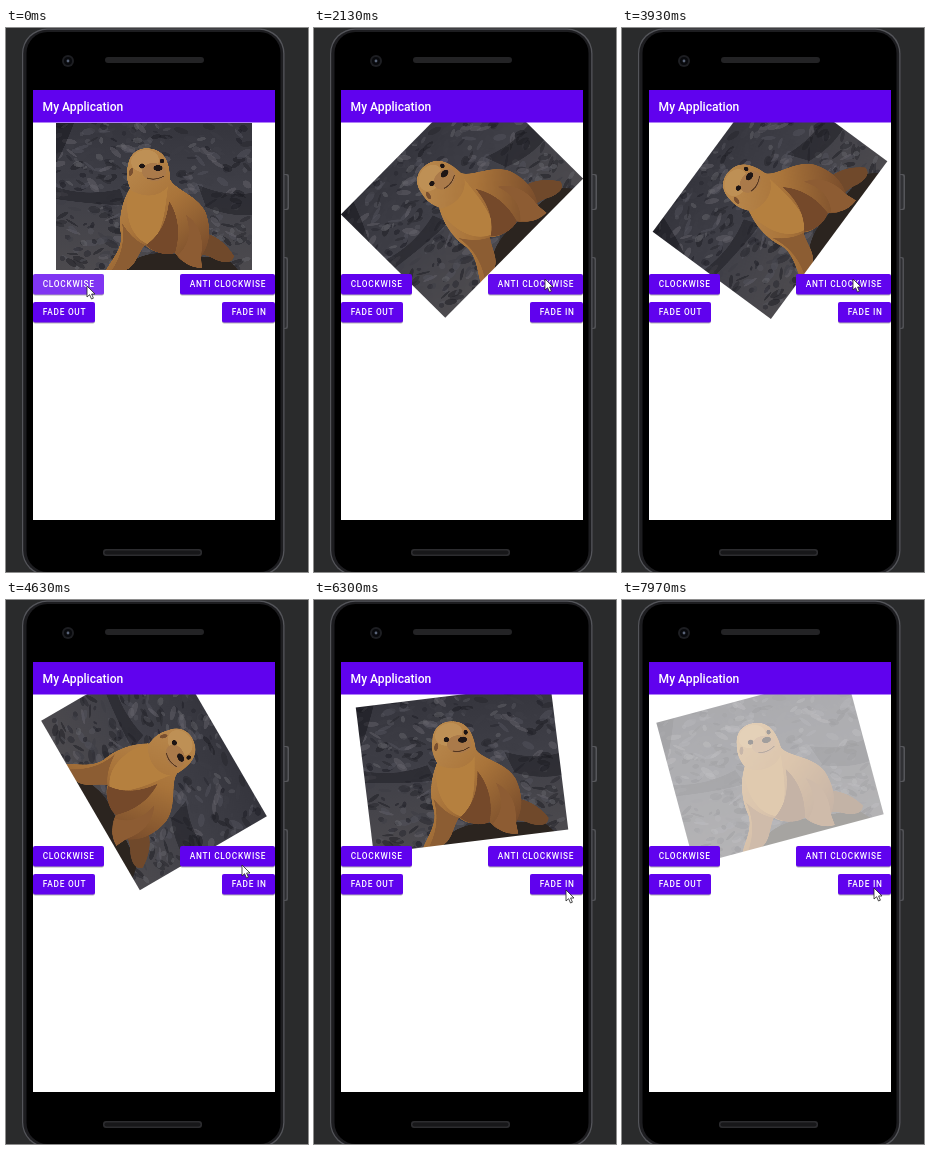
These frames come from a looping animation (302x544 px, 8000 ms). An HTML page with a canvas:

```html
<!DOCTYPE html>
<html lang="en">
<head>
<meta charset="utf-8">
<title>Rotate and fade</title>
<style>
html, body { margin: 0; width: 100%; height: 100%; overflow: hidden; background: #2a2b2c; }
canvas { display: block; width: 302px; height: 544px; }
</style>
</head>
<body>
<canvas id="stage"></canvas>
<script>
const W = 302, H = 544, LOOP = 8000;
const PHOTO = { w: 196, h: 147, cx: 148, cy: 168.5 };
const SCREEN = { x: 27, y: 62, w: 242, h: 430 };
const PURPLE = '#6002ee';

const stage = document.getElementById('stage');
const dpr = window.devicePixelRatio || 1;
stage.width = W * dpr;
stage.height = H * dpr;
const ctx = stage.getContext('2d');

const clamp = v => Math.max(0, Math.min(1, v));
const ease = p => 0.5 - Math.cos(Math.PI * clamp(p)) / 2;
const lerp = (a, b, p) => a + (b - a) * p;

function box(c, x, y, w, h, r, fill) {
  c.beginPath();
  c.roundRect(x, y, w, h, r);
  c.fillStyle = fill;
  c.fill();
}

function oval(c, x, y, rx, ry, fill, turn = 0) {
  c.beginPath();
  c.ellipse(x, y, rx, ry, turn, 0, Math.PI * 2);
  c.fillStyle = fill;
  c.fill();
}

function shape(c, path, fill) {
  c.fillStyle = fill;
  c.fill(new Path2D(path));
}

// Seeded generator keeps the rocks the same on every load.
function seeded(seed) {
  return () => {
    seed = (seed * 1664525 + 1013904223) % 4294967296;
    return seed / 4294967296;
  };
}

function drawRocks(c) {
  const bg = c.createLinearGradient(0, 0, 0, PHOTO.h);
  bg.addColorStop(0, '#35353d');
  bg.addColorStop(0.45, '#3f3f47');
  bg.addColorStop(1, '#4c4a4e');
  c.fillStyle = bg;
  c.fillRect(0, 0, PHOTO.w, PHOTO.h);

  const rnd = seeded(29);
  const tones = ['#1c1c23', '#26262d', '#53535c', '#64636a', '#3d3d45'];
  c.globalAlpha = 0.5;
  for (let i = 0; i < 420; i++) {
    oval(c, rnd() * PHOTO.w, rnd() * PHOTO.h, 2 + rnd() * 6, 1 + rnd() * 2.5,
      tones[Math.floor(rnd() * tones.length)], -0.6 + rnd() * 1.5);
  }
  shape(c, 'M0 0 H18 Q8 26 0 40Z', '#15151b');
  shape(c, 'M0 64 Q30 74 64 66 L70 82 Q40 82 0 76Z', '#1d1d23');
  shape(c, 'M142 62 Q170 74 196 70 V92 Q174 94 150 84Z', '#1d1d23');
  c.globalAlpha = 1;
}

function drawSeal(c) {
  shape(c, 'M66 147 Q80 130 108 130 L172 136 L182 147Z', '#2b241f');
  shape(c, 'M138 108 Q164 110 178 133 Q176 143 160 137 Q148 130 140 132Z', '#70492b');

  const fur = c.createLinearGradient(64, 30, 152, 135);
  fur.addColorStop(0, '#bc8c50');
  fur.addColorStop(0.5, '#a9743a');
  fur.addColorStop(1, '#75492a');
  shape(c, 'M72 42 C74 28 86 23 97 26 C110 29 114 42 114 56 C119 67 142 72 150 90' +
    ' C156 108 153 122 146 132 L142 143 C132 143 124 138 119 130 C110 132 96 130 89 122' +
    ' C82 130 80 143 70 147 L50 147 C56 136 66 126 65 112 C62 96 66 78 74 65 C70 56 70 49 72 42Z', fur);
  shape(c, 'M73 66 C88 76 104 74 112 63 C109 86 108 108 94 122 C76 116 67 94 73 66Z', '#b5803f');
  shape(c, 'M113 78 C122 92 125 110 119 130 C110 133 98 130 90 122 C104 112 111 98 113 78Z', '#75492a');
  shape(c, 'M66 100 C74 113 82 119 89 122 C82 130 80 143 70 147 L56 147 C66 132 69 116 66 100Z', '#8c5d33');
  shape(c, 'M130 92 C144 101 148 116 145 133 L146 145 C134 145 126 139 122 132 C134 121 135 108 130 92Z', '#8d5c33');

  // Face
  oval(c, 89, 38, 14, 11, '#be9055', -0.2);
  oval(c, 98, 49, 12, 9, '#aa7a4a', 0.1);
  oval(c, 102, 45, 4.5, 3, '#1e1615');
  oval(c, 86, 43, 2.8, 2.5, '#1c1413');
  oval(c, 106, 38, 2.1, 2.4, '#1c1413');
  oval(c, 75, 49, 2, 4, '#7a5030', 0.3);
  c.strokeStyle = '#543620';
  c.lineWidth = 1;
  c.stroke(new Path2D('M91 55 Q99 58 108 53'));
}

function makePhoto() {
  const cv = document.createElement('canvas');
  cv.width = PHOTO.w * 3;
  cv.height = PHOTO.h * 3;
  const c = cv.getContext('2d');
  c.scale(3, 3);
  drawRocks(c);
  drawSeal(c);
  return cv;
}

const photo = makePhoto();

// Spin start, duration, turn in degrees
const SPINS = [[50, 1000, 360], [1795, 1456, -360], [3564, 1456, -360]];

function angleAt(t) {
  let a = 0;
  for (const [start, len, turn] of SPINS) a += turn * ease((t - start) / len);
  a -= 7 * ease((t - 5020) / 1280);
  a -= 8 * ease((t - 6300) / 1670);
  return a;
}

const alphaAt = t => lerp(1, 0.42, clamp((t - 7500) / 470));

// Time, x, y of the pointer tip
const POINTER = [
  [0, 81, 258], [250, 82, 258], [930, 220, 242], [1200, 231, 251],
  [4150, 231, 251], [4630, 236, 265], [5300, 252, 290], [6300, 252, 290],
  [7000, 252, 288], [8000, 252, 288]
];

function pointerAt(t) {
  const i = POINTER.findIndex((p, n) => n > 0 && t <= p[0]);
  const a = POINTER[i - 1], b = POINTER[i];
  const p = ease((t - a[0]) / (b[0] - a[0]));
  return [lerp(a[1], b[1], p), lerp(a[2], b[2], p)];
}

const BUTTONS = [
  { label: 'CLOCKWISE', x: 27, y: 246, w: 71, clicks: [0] },
  { label: 'ANTI CLOCKWISE', x: 174, y: 246, w: 95, clicks: [1795, 3564] },
  { label: 'FADE OUT', x: 27, y: 274, w: 62, clicks: [] },
  { label: 'FADE IN', x: 216, y: 274, w: 53, clicks: [] }
];

function text(str, x, y, size, spacing) {
  ctx.font = `500 ${size}px Roboto, sans-serif`;
  ctx.letterSpacing = spacing + 'px';
  ctx.fillStyle = '#fff';
  ctx.fillText(str, x, y);
}

function drawPhone() {
  ctx.fillStyle = '#2a2b2c';
  ctx.fillRect(0, 0, W, H);
  box(ctx, 276, 146, 7, 36, 2, '#55565a');
  box(ctx, 276, 147, 5.5, 34, 2, '#303134');
  box(ctx, 276, 229, 6, 72, 2, '#505155');
  box(ctx, 276, 230, 4.5, 70, 2, '#2c2d30');
  box(ctx, 16, 0.5, 262.5, 547, 25, '#54555a');
  box(ctx, 17.2, 1.8, 260, 544.5, 24, '#1d1d20');
  box(ctx, 20.5, 4, 254, 540, 21, '#000');
  oval(ctx, 62, 33, 6, 6, '#1d1e22');
  oval(ctx, 62, 33, 4, 4, '#08090c');
  oval(ctx, 62, 33, 1.4, 1.4, '#5a6478');
  box(ctx, 99, 29, 99, 6, 3, '#232325');
  box(ctx, 97, 521, 99, 7, 3, '#2c2c2f');
  box(ctx, 98.5, 522.5, 96, 4, 2, '#171719');
}

function drawPhoto(t) {
  ctx.save();
  ctx.beginPath();
  ctx.rect(SCREEN.x, 94, SCREEN.w, SCREEN.h - 32);
  ctx.clip();
  ctx.translate(PHOTO.cx, PHOTO.cy);
  ctx.rotate(angleAt(t) * Math.PI / 180);
  ctx.globalAlpha = alphaAt(t);
  ctx.drawImage(photo, -PHOTO.w / 2, -PHOTO.h / 2, PHOTO.w, PHOTO.h);
  ctx.restore();
}

function drawButton(b, t) {
  box(ctx, b.x, b.y + 1, b.w, 20.5, 2, 'rgba(0,0,0,0.3)');
  box(ctx, b.x, b.y, b.w, 20.5, 2, PURPLE);
  for (const at of b.clicks) {
    if (t < at) continue;
    const glow = 0.2 * (1 - clamp((t - at - 80) / 300));
    box(ctx, b.x, b.y, b.w, 20.5, 2, `rgba(255,255,255,${glow})`);
  }
  text(b.label, b.x + 9.7, b.y + 13.3, 8.3, 0.74);
}

function drawPointer(t) {
  const [x, y] = pointerAt(t);
  const arrow = new Path2D('M0 0 V11 L2.6 8.7 L4.5 13 L6.4 12.2 L4.6 8 H8Z');
  ctx.save();
  ctx.translate(x, y);
  ctx.fillStyle = '#fff';
  ctx.strokeStyle = '#222';
  ctx.lineWidth = 0.8;
  ctx.fill(arrow);
  ctx.stroke(arrow);
  ctx.restore();
}

function draw(now) {
  const t = now % LOOP;
  ctx.setTransform(dpr, 0, 0, dpr, 0, 0);
  drawPhone();
  ctx.fillStyle = '#fff';
  ctx.fillRect(SCREEN.x, SCREEN.y, SCREEN.w, SCREEN.h);
  drawPhoto(t);
  ctx.fillStyle = PURPLE;
  ctx.fillRect(SCREEN.x, SCREEN.y, SCREEN.w, 32.5);
  text('My Application', 36.6, 83, 12.1, 0);
  for (const b of BUTTONS) drawButton(b, t);
  drawPointer(t);
}

const begin = performance.now();
function tick() {
  draw(performance.now() - begin);
  requestAnimationFrame(tick);
}
tick();
</script>
</body>
</html>
```
